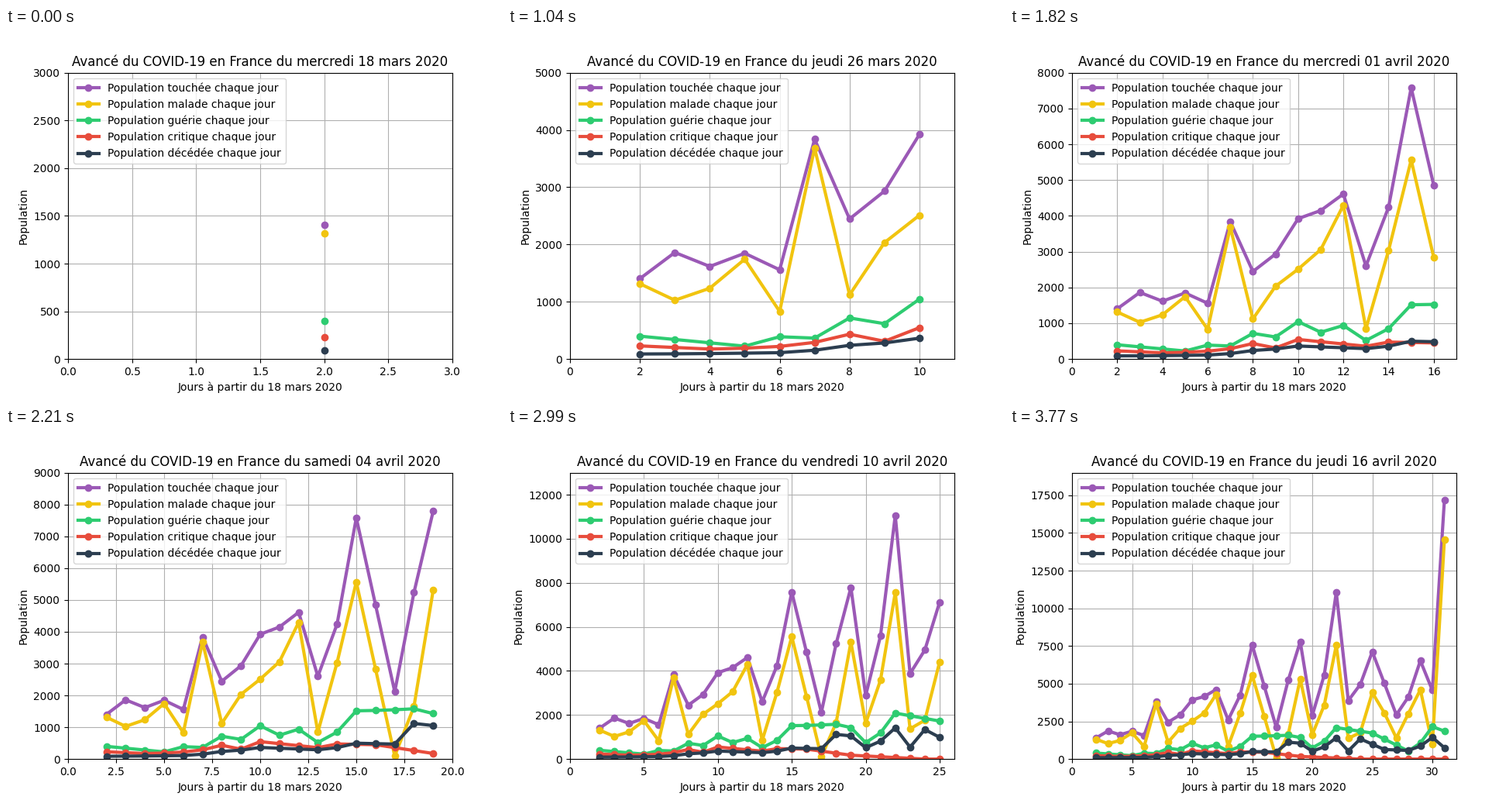
Animation, 640 px wide and 480 px high, one loop 3900 ms. Source, as a matplotlib script:

```python
from itertools import pairwise

import matplotlib.pyplot as plt
from matplotlib.animation import FuncAnimation

FRAMES = 30
FIRST_DAY = 2
RISE = 1.6  # rises start slowly, falls are straight
WEEKDAYS = ["mercredi", "jeudi", "vendredi", "samedi", "dimanche", "lundi", "mardi"]

LATE_DAYS = {2, 5, 7, 12}  # recoveries reported the day after
BACKLOG = {18: 884}  # cases counted in bulk, not newly sick

# Day from which each upper limit applies
Y_LIMITS = {2: 3000, 7: 5000, 12: 6000, 15: 8000, 19: 9000, 22: 13000, 31: 19000}


def trend(peaks):
    """Daily values through a few turning points {day: value}."""
    values = []
    for (day0, low), (day1, high) in pairwise(peaks.items()):
        power = RISE if high > low else 1
        span = day1 - day0
        values += [low + (high - low) * (i / span) ** power for i in range(span)]
    return values + [high]


def reported(counts):
    """Hold back the counts of late days until the next report."""
    result, pending = [], 0
    for day, count in enumerate(counts, FIRST_DAY):
        pending += count
        result.append(0 if day in LATE_DAYS else pending)
        pending -= result[-1]
    return result


touched = trend({2: 1404, 3: 1861, 4: 1617, 5: 1847, 6: 1559, 7: 3838, 8: 2446,
                 10: 3922, 12: 4611, 13: 2599, 15: 7578, 17: 2116, 18: 5233,
                 19: 7788, 20: 2886, 22: 11059, 23: 3881, 25: 7120, 27: 2937,
                 29: 6524, 30: 4560, 31: 17164})
recovered = trend({2: 400, 5: 226, 6: 390, 7: 366, 8: 718, 9: 618, 10: 1046,
                   11: 750, 12: 940, 13: 520, 15: 1517, 18: 1580, 19: 1430,
                   20: 745, 22: 2087, 25: 1726, 28: 532, 30: 2150, 31: 1857})
critical = trend({2: 230, 4: 175, 6: 221, 8: 434, 9: 311, 10: 548, 13: 359,
                  14: 475, 16: 452, 19: 176, 24: 0, 31: 0})
dead = trend({2: 89, 6: 112, 8: 240, 10: 365, 13: 292, 15: 499, 17: 471, 18: 1120,
              19: 1053, 20: 518, 22: 1417, 23: 541, 24: 1341, 26: 635, 28: 574,
              30: 1438, 31: 753})
sick = [t - r - d - BACKLOG.get(day, 0) for day, (t, r, d)
        in enumerate(zip(touched, reported(recovered), dead), FIRST_DAY)]

SERIES = [
    ("touchée", touched, "#9b59b6"),
    ("malade", sick, "#f1c40f"),
    ("guérie", recovered, "#2ecc71"),
    ("critique", critical, "#e74c3c"),
    ("décédée", dead, "#2c3e50"),
]

fig, ax = plt.subplots(figsize=(6.4, 4.8), dpi=100)


def date_label(step):
    day, month = (18 + step, "mars") if step < 14 else (step - 13, "avril")
    return f"{WEEKDAYS[step % 7]} {day:02d} {month} 2020"


def draw(step):
    last = FIRST_DAY + step
    days = range(FIRST_DAY, last + 1)
    ax.clear()
    for name, values, color in SERIES:
        ax.plot(days, values[:step + 1], color=color, linewidth=3, marker="o",
                label=f"Population {name} chaque jour")
    ax.set_xlim(0, last + 1)
    ax.set_ylim(0, max(top for day, top in Y_LIMITS.items() if day <= last))
    ax.set_title(f"Avancé du COVID-19 en France du {date_label(step)}")
    ax.set_xlabel("Jours à partir du 18 mars 2020")
    ax.set_ylabel("Population")
    ax.grid(True)
    ax.legend(loc="upper left")


anim = FuncAnimation(fig, draw, frames=FRAMES, init_func=lambda: draw(0),
                     interval=130, repeat=True)
plt.show()
```
